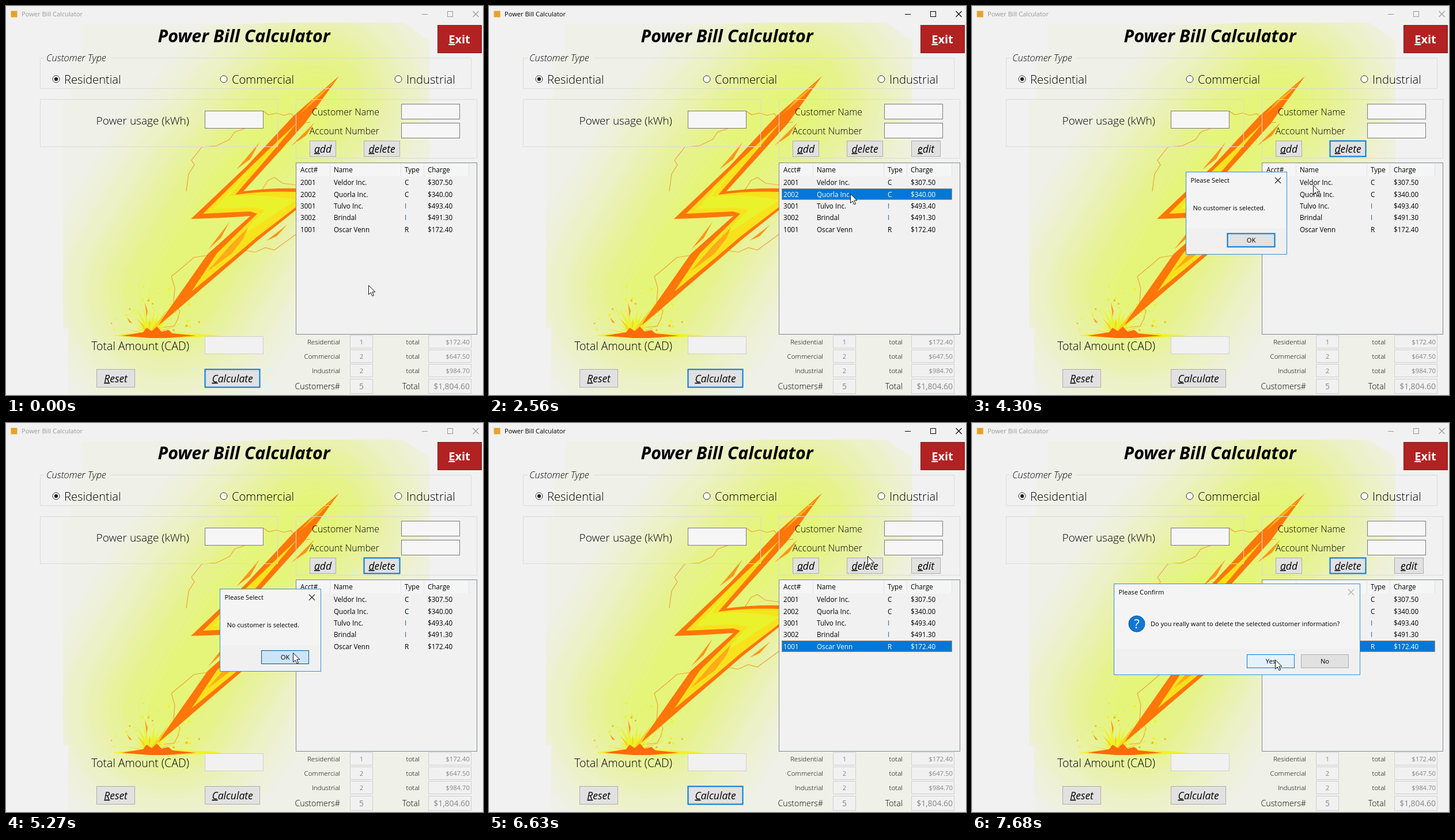
An HTML page for the animation above (7990 ms loop, 828 by 676 pixels).

```html
<!DOCTYPE html>
<html lang="en">
<head>
<meta charset="utf-8">
<title>Power Bill Calculator</title>
<style>
html, body { margin: 0; width: 100%; height: 100%; overflow: hidden; background: #f1f1f1; }
svg { display: block; width: 828px; height: 676px; font: 11.2px "Open Sans", "Noto Sans", sans-serif; }
text { white-space: pre; }
.light { font-weight: 300; }
.row { font-size: 11.7px; }
</style>
</head>
<body>
<svg id="stage" viewBox="0 0 828 676">
  <defs>
    <clipPath id="photo"><path d="M132 32H400L480 29H690L735 60V676H108V560H99V162H112V90H132Z"/></clipPath>
    <filter id="soft" filterUnits="userSpaceOnUse" x="0" y="-50" width="828" height="776"><feGaussianBlur stdDeviation="8"/></filter>
  </defs>
  <g id="art"></g>
  <g id="form"></g>
  <g id="live"></g>
</svg>
<script>
const LOOP = 7990, STEP = 135.4, BLUE = '#0078d7';
const $ = id => document.getElementById(id);

const rect = (x, y, w, h, fill, stroke = 'none', sw = 1) =>
  `<rect x="${x + .5}" y="${y + .5}" width="${w - 1}" height="${h - 1}" fill="${fill}" stroke="${stroke}" stroke-width="${sw}"/>`;
const path = (d, fill, stroke = 'none', sw = 1, more = '') =>
  `<path d="${d}" fill="${fill}" stroke="${stroke}" stroke-width="${sw}" ${more}/>`;
const text = (x, y, s, more = '') => `<text x="${x}" y="${y}" ${more}>${s}</text>`;
const size = n => `font-size="${n}" `;
const END = 'text-anchor="end" ', MID = 'text-anchor="middle" ', LIGHT = 'class="light" ', ITALIC = 'font-style="italic" ';
const accessKey = s => `<tspan text-decoration="underline">${s[0]}</tspan>${s.slice(1)}`;

const looks = {
  normal: ['#e1e1e1', '#adadad', 1],
  focus: ['#e1e1e1', BLUE, 2],
  hover: ['#e5f1fb', BLUE, 1],
  pressed: ['#cce4f7', '#005499', 1]
};
function button(x, y, w, h, label, look = 'normal', big = true) {
  const style = big ? size(17.5) + ITALIC : '';
  return rect(x, y, w, h, ...looks[look]) +
    text(x + w / 2, y + h / 2 + (big ? 6.5 : 4), big ? accessKey(label) : label, MID + style);
}

function artwork() {
  let s = '<g clip-path="url(#photo)">' + rect(90, 20, 660, 660, '#eff0e7') + '<g filter="url(#soft)">';
  [[440, '#eef1da'], [370, '#ecf1c8'], [300, '#eaf1b3'], [235, '#e7f29c'], [170, '#e5f388'], [95, '#e5f57a']].forEach(([w, c]) =>
    s += path('M538 160L470 230L385 330L330 420L285 495', 'none', c, w, 'stroke-linecap="round" stroke-linejoin="round"'));
  s += '</g></g>';

  // cracks around the bolt
  s += path(`M313 322L317 292L327 276L322 268L340 245L365 243L388 232L397 219L414 213L425 205
    M447 183L456 189L470 186L482 190L495 187L508 204L528 202
    M444 320L455 303L466 298L480 308L503 311
    M298 545L302 530L291 515L293 490L287 470L310 451L326 437L372 430L405 423L432 428L450 420L466 424L503 397
    M262 560L292 556L299 543`, 'none', '#f0a436', 1.2);

  // bolt
  s += path(`M578 122Q548 148 500 190L418 278L321 370Q370 369 424 365L350 431L259 561L340 491L402 438L440 405L504 354
    V317Q460 316 412 322L462 267L518 205Z`, '#ff760a');
  s += path('M506 202L424 280L342 361L424 357L436 361L366 430L322 496L395 436L436 401L504 349V323Q450 321 398 328L450 268Z', '#f8e21c');
  s += path('M487 222L424 284L360 353L428 350L450 354L404 402L504 337Q440 325 386 331L432 276Z', '#eaf22c');
  s += path('M420 385L388 417L350 461L392 430L412 404Z', '#ffab19');
  s += path('M574 128L533 162L510 188L545 157Z', '#ffb21a');
  s += path('M495 243L535 203L521 225ZM351 423L388 375L373 403ZM400 284L440 237L424 266ZM452 408L488 380L470 400Z', '#ff941a');

  // impact
  const rnd = n => { const v = Math.sin(n * 91.7) * 4375.5; return v - Math.floor(v); };
  for (let i = 0; i < 13; i++) {
    const a = -2.95 + i * .22, r = 24 + 30 * rnd(i + 1);
    const x = 251 + Math.cos(a) * r, y = 570 + Math.sin(a) * r;
    s += path(`M246 571L${x.toFixed(1)} ${y.toFixed(1)}L256 571Z`, i % 3 ? '#eaf32a' : '#fbd024');
  }
  for (let i = 0; i < 34; i++) {
    const a = -Math.PI * rnd(i + 20), r = 35 + 45 * rnd(i + 60);
    s += `<circle cx="${250 + Math.cos(a) * r * 1.1}" cy="${566 + Math.sin(a) * r}" r="${.7 + 1.6 * rnd(i + 99)}" fill="${i % 4 ? '#eef22a' : '#f5b52c'}"/>`;
  }
  s += path('M185 573Q245 562 375 573Q275 581 185 573Z', '#f3f029');
  s += path('M200 573L238 567L244 559L253 565L262 557L270 566L282 563L289 569L330 573L278 577L250 577Z', '#ff6a0a');
  s += path('M241 515L246 530L244 541ZM210 541L219 551L214 550Z', '#ff9a15');
  return s;
}

const summary = [
  ['Residential', 1, '$172.40'], ['Commercial', 2, '$647.50'],
  ['Industrial', 2, '$984.70'], ['Customers#', 5, '$1,804.60']
];
function formParts() {
  const line = '#d9dcd6';
  let s = rect(8, 8, 12, 12, '#e5a32b') +
    text(413, 63, 'Power Bill Calculator', MID + ITALIC + size(30.4) + 'font-weight="700"') +
    path('M66.5 90.5H59.5V143.5H807.5V90.5H182', 'none', line) +
    rect(59, 162, 413, 83, 'none', line) + rect(503, 162, 315, 103, 'none', line) +
    text(70, 96, 'Customer Type', LIGHT + ITALIC + size(16.6)) +
    rect(749, 33, 77, 49, '#b22222', '#7d1c1c') +
    text(787, 65, accessKey('Exit'), MID + size(20) + 'font-weight="700" fill="#fff"');

  [[87, 'Residential'], [378, 'Commercial'], [681, 'Industrial']].forEach(([x, label], i) => {
    s += `<circle cx="${x}" cy="127" r="6" fill="#fafafa" stroke="#333"/>`;
    if (!i) s += `<circle cx="${x}" cy="127" r="3.2" fill="#222"/>`;
    s += text(x + 14, 135, label, LIGHT + size(20.2));
  });

  s += text(318, 206, 'Power usage (kWh)', LIGHT + END + size(19)) + rect(345, 182, 102, 31, '#f6f6f6', '#7a7a7a') +
    text(648, 190, 'Customer Name', LIGHT + END + size(15.9)) + rect(686, 170, 102, 27, '#f6f6f6', '#7a7a7a') +
    text(648, 223, 'Account Number', LIGHT + END + size(15.9)) + rect(686, 203, 102, 27, '#f6f6f6', '#7a7a7a') +
    text(318, 598, 'Total Amount (CAD)', LIGHT + END + size(19.5)) + rect(345, 574, 102, 31, '#f1f1f1', '#cfcfcf') +
    button(527, 234, 46, 28, 'add') + button(157, 631, 67, 32, 'Reset');

  summary.forEach(([label, count, total], i) => {
    const last = i === 3, y = last ? 648 : 572 + 25 * i, h = last ? 26 : 23;
    const base = y + (last ? 18 : 15.5), labelStyle = LIGHT + END + size(last ? 14.2 : 11.7);
    const value = size(last ? 13.9 : 11.3) + 'fill="#858585" ';
    s += text(580, base, label, labelStyle) + text(718, base, last ? 'Total' : 'total', labelStyle) +
      rect(597, y, 40, h, '#f1f1f1', '#cfcfcf') + rect(733, y, 75, h, '#f1f1f1', '#cfcfcf') +
      text(617, base, count, MID + value) + text(805, base, total, END + value);
  });
  return s;
}

const columns = [511, 569, 692, 732];
const customers = [
  ['2001', 'Veldor Inc.', 'C', '$307.50'],
  ['2002', 'Quorla Inc.', 'C', '$340.00'],
  ['3001', 'Tulvo Inc.', 'I', '$493.40'],
  ['3002', 'Brindal', 'I', '$491.30'],
  ['1001', 'Oscar Venn', 'R', '$172.40']
];
function list(selected) {
  let s = rect(503, 272, 315, 299, '#f1f1f1', '#828790') + rect(505, 274, 299, 22, '#f5f5f5') +
    path('M562.5 274V296M685.5 274V296M725.5 274V296M803.5 274V296', 'none', '#e2e2e2');
  ['Acct#', 'Name', 'Type', 'Charge'].forEach((h, i) => s += text(columns[i], 289, h, 'class="row"'));
  customers.forEach((row, r) => {
    const y = 297 + 20.3 * r, on = r === selected;
    if (on) s += rect(508, Math.round(y), 296, 20, BLUE, '#c67a32', .6);
    row.forEach((cell, i) =>
      s += text(columns[i], y + 14.3, cell, `class="row" fill="${on ? '#fff' : cell === 'I' ? '#1560a8' : '#000'}"`));
  });
  return s;
}

const cross = (x, y, color) => path(`M${x} ${y}l10 10m0 -10l-10 10`, 'none', color, 1.1);

function dialog(x, y, w, h, title, closeColor) {
  return rect(x, y, w, h, '#f4f4f4', '#2f8fdd') + rect(x + 1, y + h - 46, w - 2, 45, '#f0f0f0') +
    text(x + 8.5, y + 19, title) + cross(x + w - 21, y + 10, closeColor);
}

const track = [
  [0, 629, 485], [135, 629, 485], [480, 640, 538], [630, 640, 538], [1083, 632, 302], [1390, 632, 302],
  [1760, 637, 423], [1896, 640, 538], [2031, 640, 538], [2301, 627, 326], [2708, 627, 326],
  [2979, 640, 438], [3114, 640, 438], [3385, 667, 241], [4010, 667, 241], [4738, 498, 399],
  [5420, 498, 399], [5687, 640, 383], [6228, 640, 383], [6634, 657, 231], [6770, 657, 240],
  [7176, 657, 240], [7700, 526, 411], [9000, 526, 411]
];
function pointer(t) {
  const q = Math.floor((t + 40) / STEP) * STEP;
  const i = track.findIndex(k => k[0] > q), [t0, x0, y0] = track[i - 1], [t1, x1, y1] = track[i];
  const p = (q - t0) / (t1 - t0);
  return path('M.5.5V16.5L4.2 13L7 19L9.5 18L6.8 12H11.8Z', '#fff', '#111', 1,
    `transform="translate(${Math.round(x0 + (x1 - x0) * p)} ${Math.round(y0 + (y1 - y0) * p)})"`);
}

// value of the last [start, value] entry already reached
const at = (t, plan) => plan.filter(p => p[0] <= t).pop()[1];

function scene(t) {
  const active = at(t, [[0, 0], [500, 1], [3900, 0], [5420, 1], [6890, 0]]);
  const selected = at(t, [[0, -1], [1240, 0], [2000, -1], [2560, 1], [3080, -1], [5970, 4]]);
  const del = at(t, [[0, 'normal'], [3350, 'hover'], [3760, 'pressed'], [3900, 'focus'],
    [5970, 'normal'], [6740, 'pressed'], [6890, 'focus']]);
  const calc = at(t, [[0, 'focus'], [3760, 'normal'], [5970, 'focus'], [6740, 'normal']]);
  const box = at(t, [[0, 0], [3900, 1], [5420, 0], [6890, 2]]);
  const ink = active ? '#000' : '#999';

  let s = text(27, 18, 'Power Bill Calculator', size(11.1) + `fill="${ink}"`) +
    path('M722 14.5h10', 'none', ink) + rect(766, 9, 10, 10, 'none', ink) + cross(810.5, 9, ink) +
    button(621, 234, 63, 28, 'delete', del) + button(345, 631, 96, 32, 'Calculate', calc);
  if (selected >= 0) s += button(733, 234, 51, 28, 'edit');
  s += list(selected);

  if (box === 1) {
    const ok = at(t, [[0, 'focus'], [4850, 'hover'], [5120, 'pressed']]);
    s += dialog(371, 288, 176, 144, 'Please Select', '#222') +
      text(383.5, 355, 'No customer is selected.', size(11)) + button(443, 395, 83, 24, 'OK', ok, false);
  } else if (box === 2) {
    const yes = t < 7650 ? 'focus' : 'hover';
    s += dialog(246, 279, 428, 159, 'Please Confirm', '#aaa') +
      '<circle cx="286" cy="349" r="14" fill="#0f78d4" stroke="#0a4f94"/>' +
      text(286, 357, '?', MID + size(22) + 'fill="#fff"') +
      text(310, 353, 'Do you really want to delete the selected customer information?', size(11)) +
      button(477, 402, 83, 24, 'Yes', yes, false) + button(571, 402, 83, 24, 'No', 'normal', false);
  }
  return s + pointer(t);
}

$('art').innerHTML = artwork();
$('form').innerHTML = formParts();
let shown;
function frame() {
  const next = scene(performance.now() % LOOP);
  if (next !== shown) $('live').innerHTML = shown = next;
  requestAnimationFrame(frame);
}
frame();
</script>
</body>
</html>
```
